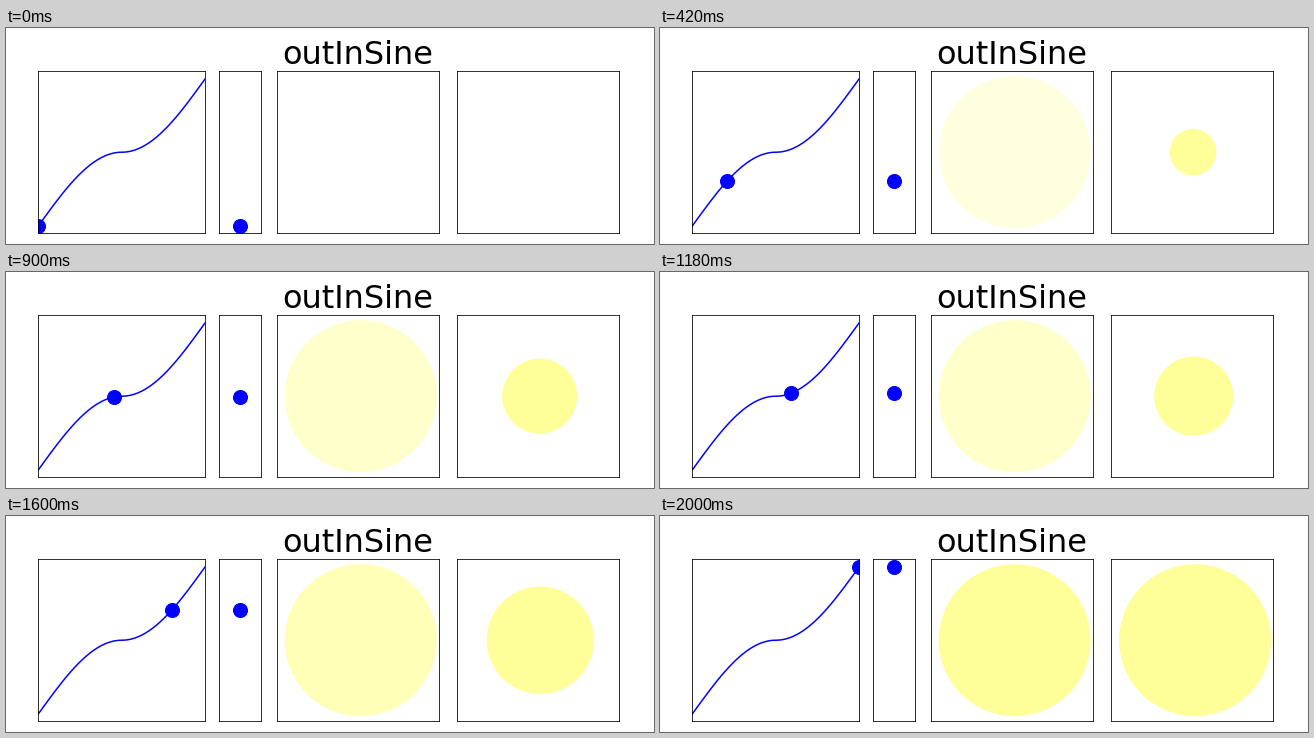
Write a matplotlib script that moves like this. It is 648x216 px and loops after 2020 ms.

```python
import numpy as np
import matplotlib.pyplot as plt
from matplotlib.animation import FuncAnimation
from matplotlib.patches import Circle

W, H, DPI = 648, 216, 72
STEPS = 100
HALF = 81
BADGE_X, BADGE_R = 3, 76
BADGE_COLOR = "#ffff99"


def out_in_sine(t):
    s = np.sin(np.pi * t) / 2
    return np.where(t < 0.5, s, 1 - s)


def add_dot(ax):
    ax.set(xlim=(0, 1), ylim=(-0.05, 1.05))
    dot, = ax.plot([], [], "o", color="b", markersize=14)
    return dot


def add_badge(ax):
    ax.set(xlim=(-HALF, HALF), ylim=(-HALF, HALF), aspect="equal")
    return ax.add_patch(Circle((BADGE_X, 0), BADGE_R, color=BADGE_COLOR, lw=0))


plt.rcParams["font.family"] = "DejaVu Sans"
fig, (curve_ax, rail_ax, fade_ax, zoom_ax) = plt.subplots(
    1, 4, figsize=(W / DPI, H / DPI), dpi=DPI, facecolor="white",
    subplot_kw={"xticks": [], "yticks": []},
    gridspec_kw={"width_ratios": [4, 1, 4, 4], "wspace": 0.1,
                 "left": 0.05, "right": 0.95, "bottom": 0.05, "top": 0.8})

curve_dot, rail_dot = add_dot(curve_ax), add_dot(rail_ax)
fade_badge, zoom_badge = add_badge(fade_ax), add_badge(zoom_ax)

x = np.linspace(0, 1, STEPS + 1)
curve_ax.plot(x, out_in_sine(x), color="b", lw=1.5)
fade_ax.set_title("outInSine", fontsize=32, pad=6)


def update(i):
    t = i / STEPS
    v = float(out_in_sine(t))
    curve_dot.set_data([t], [v])
    rail_dot.set_data([0.5], [v])
    fade_badge.set_alpha(v)
    zoom_badge.set_radius(BADGE_R * v)
    zoom_badge.center = (BADGE_X * v, 0)
    return curve_dot, rail_dot, fade_badge, zoom_badge


anim = FuncAnimation(fig, update, frames=STEPS + 1, interval=20, repeat=True, repeat_delay=0)
plt.show()
```
